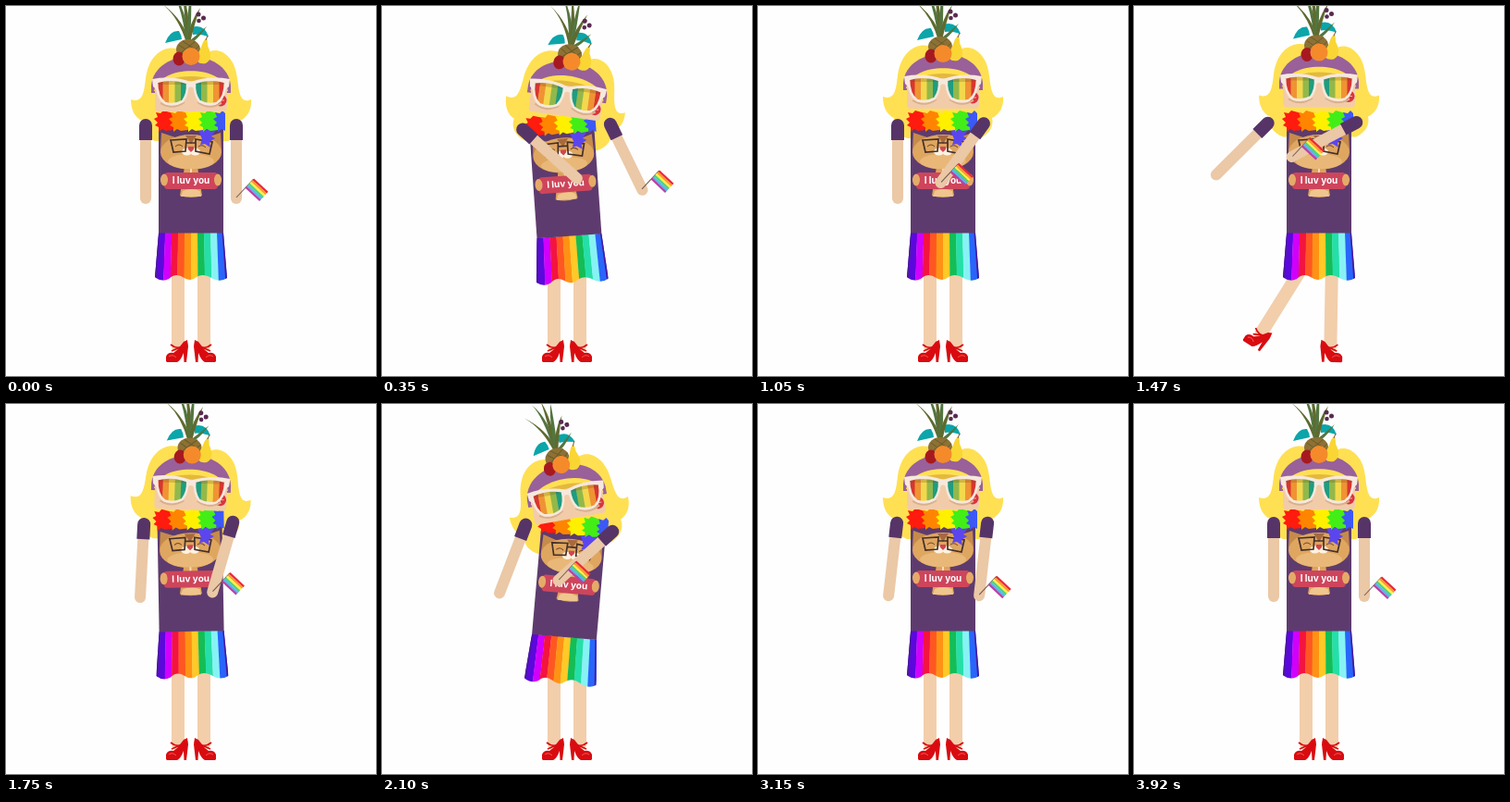
An HTML page that plays this animation: 400 by 400 pixels, repeating every 3.99 s.

```html
<!DOCTYPE html>
<html>
<head>
<meta charset="utf-8">
<style>
  html, body { margin: 0; width: 100%; height: 100%; overflow: hidden; background: #fefefe; }
  svg { display: block; width: 100vw; height: 100vh; }
  text { font: 700 10px Inter, sans-serif; }
</style>
</head>
<body>
<svg viewBox="0 0 400 400">
  <defs>
    <clipPath id="skirtShape"><path d="M165 245H235L239 294Q232 299 224 295Q213 288 206 293Q199 299 191 293Q183 288 176 295Q168 299 161 293Z"/></clipPath>
    <clipPath id="lensShape"><path id="lensOutline" d="M163 82Q180 77 196 83Q197 95 191 103Q182 108 172 105Q163 99 163 82Z"/></clipPath>
    <g id="leg">
      <path d="M179 276H193V367Q191 374 186 374Q179 374 179 366Z" fill="#f2ceab"/>
      <path d="M173 384V379Q175 374 181 375L185 372L192 363L196 361L197 368L195 385H192.500L192 375Q189 383 185 385H174Z" fill="#d90b10"/>
      <path d="M178 366Q186 373 196 365M179 373L188 369" fill="none" stroke="#d90b10" stroke-width="1.700"/>
      <path d="M176 379Q180 376 184 380" fill="none" stroke="#f36b61" stroke-width=".8"/>
    </g>
    <g id="arm">
      <rect x="-6" y="-4" width="12" height="89" rx="6" fill="#ebc8a6"/>
      <path d="M-7 16V0A7 7 0 0 1 7 0V16Z" fill="#563467"/>
    </g>
    <g id="lens">
      <g id="lensStripes" clip-path="url(#lensShape)"></g>
      <use href="#lensOutline" fill="none" stroke="#f6e8dd" stroke-width="2.600"/>
    </g>
  </defs>

  <g id="hair" fill="#ffe052">
    <path d="M200 54C182 38 156 44 151 78C149 96 147 105 135 101C135 113 140 121 147 124C145 132 149 141 161 146H240C251 141 255 132 253 124C260 121 266 113 265 101C254 106 252 96 250 78C247 50 226 42 216 52Z"/>
  </g>
  <use id="legL" href="#leg"/>
  <g id="legR"><use href="#leg" transform="matrix(-1 0 0 1 400 0)"/></g>

  <g id="body">
    <g id="skirt" clip-path="url(#skirtShape)"></g>
    <rect x="165" y="120" width="70" height="125.5" fill="#5e3b6e"/>
    <g id="cat">
      <path d="M167 157L168 137L186 143ZM233 157L232 137L214 143Z" fill="#c68b4c"/>
      <path d="M193 174H207L212 205Q200 209 188 205Z" fill="#dca35d"/>
      <ellipse cx="200" cy="158" rx="33" ry="19" fill="#dfa660"/>
      <ellipse cx="200" cy="168" rx="25" ry="8" fill="#e9b878"/>
      <path d="M194 140L200 149L206 140Z" fill="#a8693c"/>
      <path d="M200 176V181" stroke="#f7dbb4" stroke-width="2"/>
      <ellipse cx="195.500" cy="157.500" rx="5.500" ry="4" fill="#fff2e0"/>
      <ellipse cx="204.500" cy="157.500" rx="5.500" ry="4" fill="#fff2e0"/>
      <path d="M197 152H203V155L200 158L197 155Z" fill="#d34552"/>
      <path d="M178 145L195 144L194 157L181 158ZM205 144L223 147L220 160L205 157ZM195 148H205" fill="none" stroke="#44302c" stroke-width="1.700"/>
      <path d="M183 152Q187 148 191 152M208 152Q212 149 216 153" fill="none" stroke="#754526"/>
      <path d="M191 200Q200 196 210 200L211 206H189Z" fill="#efc68e"/>
      <rect x="171" y="180" width="58" height="18" rx="4" fill="#ce455b"/>
      <ellipse cx="171" cy="188" rx="4" ry="6.500" fill="#e5aa68"/>
      <ellipse cx="229" cy="188" rx="4" ry="6.500" fill="#e5aa68"/>
      <text x="200" y="192" text-anchor="middle" fill="#fff">I luv you</text>
    </g>
    <path d="M208 134H227L222 141L226 143L220 147L221 153L215 149L210 150L212 144Z" fill="#5b46ee"/>
    <g id="scarf"></g>
  </g>

  <g id="head">
    <path d="M157 86C161 44 239 44 243 86V94H157Z" fill="#99609a"/>
    <path d="M160 92C166 63 234 63 240 92Z" fill="#ffe052"/>
    <path d="M164 88C174 72 226 72 236 88Z" fill="#e3b93d"/>
    <path d="M161 88Q200 74 239 88V110Q239 114 235 114H165Q161 114 161 110Z" fill="#f2cca9"/>
    <circle cx="232" cy="102" r="6.500" fill="#d9343b"/>
    <path d="M229 102H236M232 99V105" stroke="#f5b0a2"/>
    <path d="M167 105Q180 113 193 104M207 104Q220 113 233 105" fill="none" stroke="#d9b08d" stroke-width="2"/>
    <path d="M158 79Q180 75 200 82Q220 75 242 79L241 87L236 92H206Q200 83 194 92H164L159 87Z" fill="#f6e8dd"/>
    <use href="#lens"/>
    <use href="#lens" transform="matrix(-1 0 0 1 400 0)"/>
    <path d="M172 40Q177 26 187 27Q190 32 190 36ZM201 23Q214 19 219 33Q209 30 202 31Z" fill="#0ba5aa"/>
    <g id="crown"></g>
    <ellipse cx="197" cy="47" rx="13" ry="11" fill="#8d7134"/>
    <path d="M187 42L205 55M191 38L209 50M205 38L186 53M209 43L194 57" stroke="#665c2b"/>
    <path d="M216 35Q218 36 218 43Q225 57 216 62Q205 64 206 54Q211 46 213 39Z" fill="#f9d633"/>
    <path d="M216 37L218 32" stroke="#79572a"/>
    <ellipse cx="187" cy="57" rx="6.500" ry="7.500" fill="#a71920"/>
    <circle cx="200" cy="54.500" r="9.500" fill="#f58a2b"/>
    <g fill="#592b50"><circle cx="208" cy="9" r="2.500"/><circle cx="213.500" cy="13" r="2.500"/><circle cx="208.500" cy="16" r="2.300"/></g>
  </g>

  <use id="armL" href="#arm"/>
  <g id="armR"><use href="#arm"/><g id="flag"><path d="M0 0V-27" stroke="#70564b"/></g></g>
</svg>
<script>
const $ = id => document.getElementById(id);
const addShape = (parent, tag, attrs) => {
  const el = document.createElementNS('http://www.w3.org/2000/svg', tag);
  for (const key in attrs) el.setAttribute(key, attrs[key]);
  $(parent).append(el);
};

['#5b08dc', '#d000fc', '#f3143f', '#ff5722', '#ff9215', '#ffc927', '#14bd55', '#25dfa8', '#87f2f4', '#2865fb']
  .forEach((fill, i) => {
    const x = 165 + i * 7, foot = x + (i - 5) * .5;
    const left = i ? foot : 155, right = i < 9 ? foot + 7.8 : 245;
    addShape('skirt', 'path', { d: `M${x} 245H${x + 7.3}L${right} 302H${left}Z`, fill });
  });
addShape('skirt', 'path', { d: 'M161 300L165 245M239 300L235 245', stroke: '#4a199e', 'stroke-width': 3 });

['#d8352f', '#ef9334', '#f3d84c', '#93b84a', '#1f9c80'].forEach((fill, i) =>
  addShape('lensStripes', 'rect', { x: 163 + i * 6.5, y: 77, width: 7, height: 32, fill }));
addShape('lensStripes', 'path', { d: 'M163 77H197V85H163Z', fill: '#714b25', opacity: .25 });

// Thin leaves fan out from the pineapple and arch toward their tips.
[[169, -2], [180, -14], [190, -16], [200, -12], [210, 2], [217, 22]].forEach(([x, y], i) => {
  const bend = 197 + (x - 197) * .3;
  addShape('crown', 'path', {
    d: `M195 40Q${bend - 2} ${y + 14} ${x} ${y}Q${bend + 3} ${y + 16} 199 40Z`,
    fill: i % 2 ? '#537540' : '#5f6a2f' });
});

['#ff1b0d', '#ff8500', '#fff000', '#43ee16', '#3d58f5'].forEach((fill, i) => {
  const x = 162 + i * 16, w = i < 4 ? 19 : 11;
  addShape('scarf', 'path', {
    d: `M${x} 115L${x + 5} 116L${x + 8} 113L${x + w} 116V134L${x + 11} 135L${x + 7} 133L${x + 3} 136`
      + `L${x + 3} 131L${x - 1} 129L${x + 2} 126L${x - 2} 122L${x + 2} 120Z`, fill });
});

['#e9293b', '#ff9a2d', '#fff04a', '#4fd37b', '#58b5ee', '#b742a8'].forEach((fill, i) =>
  addShape('flag', 'rect', { x: 0, y: -28 + i * 2.3, width: 21, height: 2.4, fill }));

const LOOP = 3990, STEP = 70;
// time, body tilt, head drop, left arm, right arm, left kick, right kick
const poses = [
  [0, 0, 0, 0, 0, 0, 0],
  [350, -4, 5, 48, 26, 0, 0],
  [630, 1, -8, 46, -13, 2.5, -1],
  [910, 0, -5, -41, -60, 30, -1],
  [1050, 0, -3, 0, -36, 0, 0],
  [1190, 1, -8, 42, -14, 0, 30],
  [1330, 0, -3, 0, -36, 0, 0],
  [1470, 0, -4.5, -45, -62, 32, -1],
  [1680, 0, -2, -20, -30, 0, 0],
  [1890, -4, 8, 48, 25, 0, 0],
  [2100, 5, 10, -21, -48, 0, 0],
  [2240, 5, 8, -40, -52, 0, 0],
  [2520, -5, 8, 48, 25, 0, 0],
  [2730, -2, 6, 34, 18, 0, 0],
  [2940, .5, 1, -10, -8, 0, 0],
  [3150, 0, 0, -6.5, -6.5, 0, 0],
  [3430, 0, 0, 0, 0, 0, 0],
  [LOOP, 0, 0, 0, 0, 0, 0]
];

function poseAt(time) {
  const next = poses.findIndex(p => p[0] > time);
  const a = poses[next - 1], b = poses[next];
  const k = (1 - Math.cos(Math.PI * (time - a[0]) / (b[0] - a[0]))) / 2;
  return a.map((v, i) => v + (b[i] - v) * k);
}

const place = (id, transform) => $(id).setAttribute('transform', transform);

function placeArm(id, side, angle, tilt, dx, dy) {
  const r = tilt * Math.PI / 180, x = side * 49, y = -116;
  const px = 200 + dx + x * Math.cos(r) - y * Math.sin(r) + angle * .14;
  const py = 245 + dy + x * Math.sin(r) + y * Math.cos(r) - Math.abs(angle) * .05;
  place(id, `translate(${px} ${py}) rotate(${-angle})`);
}

function draw(now) {
  const time = Math.floor(now % LOOP / STEP) * STEP;
  const [, tilt, drop, armL, armR, kickL, kickR] = poseAt(time);
  const dx = -tilt * .6, dy = Math.max(0, drop) * .65;
  const head = `translate(${tilt * 1.2} ${drop}) rotate(${-tilt * 2} 200 125)`;
  place('body', `translate(${dx} ${dy}) rotate(${tilt} 200 245)`);
  place('head', head);
  place('hair', head);
  placeArm('armL', -1, armL, tilt, dx, dy);
  placeArm('armR', 1, armR, tilt, dx, dy);
  place('flag', `translate(0 78) rotate(${armR + 43})`);
  place('legL', `rotate(${kickL} 186 276)`);
  place('legR', `rotate(${-kickR} 214 276)`);
  requestAnimationFrame(draw);
}
requestAnimationFrame(draw);
</script>
</body>
</html>
```
